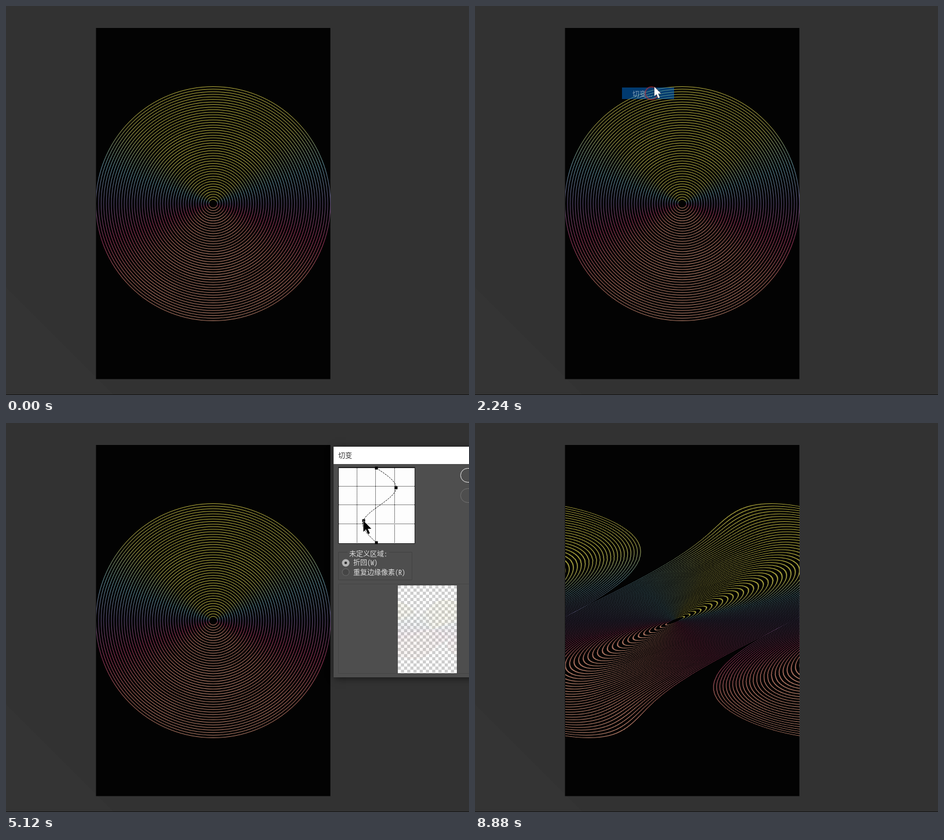
Animation of 800 by 673 pixels, one loop 9200 ms. Source, as an HTML page with a canvas:

```html
<!DOCTYPE html>
<html lang="zh-CN">
<head>
<meta charset="utf-8">
<title>切变</title>
<style>
html, body { margin: 0; width: 100%; height: 100%; overflow: hidden; background: #323232; }
canvas { display: block; }
</style>
</head>
<body>
<canvas id="stage" width="800" height="673"></canvas>
<script>
const LOOP = 9200, STEP = 80, W = 405, H = 607, K = 2, ROW = 20.9, MOVE = 480;
const RINGS = 45, INNER = 7.5, OUTER = 202.5;
const ctx = document.getElementById('stage').getContext('2d');
const UI = '"Noto Sans CJK SC", "Noto Sans CJK", sans-serif';
const FIXED = '"Noto Sans Mono CJK SC", ' + UI;
const BLUE = '#0073dc';
const PALETTE = ['#b2aa3c', '#a09c46', '#5f8f9c', '#5c4c76', '#98345a', '#a8665a', '#b8806a'];
const MENU = ['风格化', '模糊', '模糊画廊', '扭曲', '锐化', '视频', '像素化', '渲染', '杂色', '其它'];
const SUB = ['波浪...', '波纹...', '极坐标...', '挤压...', '切变...', '球面化...', '水波...', '旋转扭曲...', '置换...'];
const ARROW = new Path2D('M0 0V16L3.7 12.6 6.6 19.4 9.3 18.2 6.4 11.6H11.4Z');

// Pointer stops: [arrival, x, y]; each move fills at most the last MOVE ms before arrival
const STOPS = [
  [640, 100, 0], [960, 111, 64], [1520, 264, 67], [2000, 305, 151], [2160, 305, 151],
  [2240, 310, 140], [2880, 640, 165], [3520, 640, 112], [4080, 674, 112], [4720, 640, 165],
  [5360, 595, 173], [6240, 674, 112], [6800, 679, 112], [7680, 595, 173], [7840, 598, 172]];

// Drags of the two curve points: [press, release]
const UPPER = [[3520, 4080], [6320, 6800]];
const LOWER = [[3040, 3040], [4720, 5360], [7760, 7840]];
const CLICKS = [2160, ...[...UPPER, ...LOWER].map(d => d[0])];

const clamp = (v, a = 0, b = 1) => Math.max(a, Math.min(b, v));

function pointerAt(t) {
  const i = Math.max(1, STOPS.findLastIndex(s => s[0] <= t) + 1);
  const a = STOPS[i - 1], b = STOPS[i] || a;
  const u = clamp(1 - (b[0] - t) / Math.min(MOVE, b[0] - a[0] || 1)), e = u * u * (3 - 2 * u);
  return [a[1] + (b[1] - a[1]) * e, a[2] + (b[2] - a[2]) * e];
}

// A point follows the pointer while dragged and stays where it was released
function dragged(drags, t) {
  const d = drags.findLast(d => d[0] <= t);
  return d ? [pointerAt(Math.min(t, d[1]))] : [];
}

const nodesAt = t => [[640, 78], ...dragged(UPPER, t), ...dragged(LOWER, t), [640, 207]];

// Natural cubic spline giving x for each y
function spline(p) {
  const n = p.length - 1, c = Array(n + 1).fill(0), m = c.slice();
  for (let i = 1; i < n; i++) {
    const h0 = p[i][1] - p[i - 1][1], h1 = p[i + 1][1] - p[i][1];
    const a = 2 * (h0 + h1) - h0 * c[i - 1];
    const bend = (p[i + 1][0] - p[i][0]) / h1 - (p[i][0] - p[i - 1][0]) / h0;
    c[i] = h1 / a;
    m[i] = (6 * bend - h0 * m[i - 1]) / a;
  }
  for (let i = n - 1; i > 0; i--) m[i] -= c[i] * m[i + 1];
  return y => {
    let i = 0;
    while (i < n - 1 && y > p[i + 1][1]) i++;
    const h = p[i + 1][1] - p[i][1], u = y - p[i][1], v = p[i + 1][1] - y;
    return (m[i] * v ** 3 + m[i + 1] * u ** 3) / (6 * h)
      + (p[i][0] / h - m[i] * h / 6) * v + (p[i + 1][0] / h - m[i + 1] * h / 6) * u;
  };
}

function sheet(w, h) {
  const c = document.createElement('canvas');
  c.width = w;
  c.height = h;
  return c;
}

function makeDisc() {
  const c = sheet(W * K, H * K), g = c.getContext('2d');
  g.scale(K, K);
  g.translate(W / 2, 304);
  for (let i = 0; i < RINGS; i++) {
    const r = INNER + (OUTER - INNER) * i / (RINGS - 1);
    const grad = g.createLinearGradient(0, -r, 0, r);
    PALETTE.forEach((color, j) => grad.addColorStop(j / (PALETTE.length - 1), color));
    g.strokeStyle = grad;
    g.beginPath();
    g.arc(0, 0, r, 0, 7);
    g.stroke();
  }
  return c;
}

// Shift every row sideways along the curve, wrapping at the edges
function shear(src, nodes) {
  const w = src.width, h = src.height, c = sheet(w, h), g = c.getContext('2d'), f = spline(nodes);
  for (let y = 0; y < h; y++) {
    const dx = Math.round((f(78 + 129 * y / h) - 640) / 131 * h);
    for (const k of [-w, 0, w]) g.drawImage(src, 0, y, w, 1, dx + k, y, w, 1);
  }
  return c;
}

const disc = makeDisc(), mini = sheet(102, 152), result = shear(disc, nodesAt(LOOP));
const mg = mini.getContext('2d');
mg.imageSmoothingQuality = 'high';
mg.drawImage(disc, 0, 0, 102, 152);

function rect(color, x, y, w, h) {
  ctx.fillStyle = color;
  ctx.fillRect(x, y, w, h);
}

function frame(color, x, y, w, h, r = 0) {
  ctx.strokeStyle = color;
  ctx.beginPath();
  ctx.roundRect(x, y, w, h, r);
  ctx.stroke();
}

function dot(color, x, y, r) {
  ctx.fillStyle = color;
  ctx.beginPath();
  ctx.arc(x, y, r, 0, 7);
  ctx.fill();
}

function label(s, x, y, color, font = UI) {
  ctx.font = '12px ' + font;
  ctx.textBaseline = 'middle';
  ctx.fillStyle = color;
  ctx.fillText(s, x, y);
}

function shadowed(blur, off, draw) {
  ctx.save();
  ctx.shadowColor = 'rgba(0,0,0,.55)';
  ctx.shadowBlur = blur;
  ctx.shadowOffsetX = ctx.shadowOffsetY = off;
  draw();
  ctx.restore();
}

function faded(alpha, draw) {
  if (alpha <= 0) return;
  ctx.save();
  ctx.globalAlpha = Math.min(1, alpha);
  draw();
  ctx.restore();
}

function menu(items, x, y, w, h, top, hot, arrows) {
  shadowed(5, 3, () => rect('#f0f0f0', x, y, w, h));
  frame('#b4b4b4', x + .5, y + .5, w - 1, h - 1);
  items.forEach((s, i) => {
    const cy = top + 10 + i * ROW, color = i === hot ? '#fff' : '#222';
    if (i === hot) rect(BLUE, x + 2, Math.round(cy - 10), w - 5, 20);
    label(s, x + 19, cy + 1, color);
    if (!arrows) return;
    ctx.fillStyle = i === hot ? '#fff' : '#000';
    ctx.beginPath();
    ctx.moveTo(243, cy - 6);
    ctx.lineTo(248.5, cy - 1);
    ctx.lineTo(243, cy + 4);
    ctx.fill();
  });
}

function curveBox(nodes) {
  rect('#222', 574, 76, 133, 133);
  rect('#fdfdfd', 575, 78, 131, 130);
  ctx.save();
  ctx.strokeStyle = '#111';
  ctx.setLineDash([1, 1]);
  ctx.beginPath();
  for (let i = 0; i < 3; i++) {
    const d = Math.round(i * 32.4);
    ctx.moveTo(606.5 + d, 78);
    ctx.lineTo(606.5 + d, 208);
    ctx.moveTo(575, 109.5 + d);
    ctx.lineTo(706, 109.5 + d);
  }
  ctx.stroke();
  ctx.setLineDash([3, 1.5]);
  ctx.beginPath();
  const f = spline(nodes);
  for (let y = 78; y <= 207; y++) ctx.lineTo(f(y), y);
  ctx.stroke();
  ctx.restore();
  for (const [x, y] of nodes) rect('#000', Math.round(x) - 2.5, Math.round(y) - 2.5, 5, 5);
}

function preview(nodes) {
  frame('#464646', 574.5, 278.5, 240, 155);
  ctx.save();
  ctx.beginPath();
  ctx.rect(677, 281, 102, 152);
  ctx.clip();
  rect('#fff', 677, 281, 102, 152);
  for (let j = 0; j < 29; j++)
    for (let i = j % 2; i < 19; i += 2) rect('#cdcdcd', 677 + i * 5.4, 281 + j * 5.4, 5.4, 5.4);
  ctx.globalAlpha *= .3;
  ctx.drawImage(shear(mini, nodes), 677, 281);
  ctx.restore();
}

function dialog(t) {
  const nodes = nodesAt(t);
  shadowed(12, 2, () => rect('#4e4e4e', 566, 41, 260, 399));
  rect('#fff', 566, 41, 260, 30);
  label('切变', 574, 56, '#333');
  curveBox(nodes);
  frame('#e8e8e8', 785.5, 78.5, 60, 24, 12);
  frame('#707070', 785.5, 113.5, 60, 24, 12);
  frame('#424242', 574.5, 223.5, 127, 48);
  rect('#4e4e4e', 590, 220, 72, 8);
  label('未定义区域:', 593, 226, '#ddd', FIXED);
  dot('#b4b4b4', 587, 242, 6.5);
  dot('#333', 587, 242, 2.3);
  dot('#6a6a6a', 587, 258, 6.5);
  dot('#454545', 587, 258, 5.5);
  label('折回(W)', 600, 241, '#ddd', FIXED);
  label('重复边缘像素(R)', 600, 258, '#ddd', FIXED);
  preview(nodes);
}

function pointer(x, y, black) {
  ctx.save();
  ctx.translate(x, y);
  if (black) ctx.scale(1.2, 1.2);
  ctx.fillStyle = black ? '#000' : '#fff';
  ctx.strokeStyle = black ? '#fff' : '#222';
  ctx.lineWidth = .8;
  ctx.stroke(ARROW);
  ctx.fill(ARROW);
  ctx.restore();
}

// A ring spreads from where the button was pressed
function ripple(start, t) {
  const age = t - start;
  if (age < 0 || age > 240) return;
  faded(.8 - age / 400, () => {
    ctx.lineWidth = 2;
    ctx.strokeStyle = '#b8323a';
    ctx.beginPath();
    ctx.arc(...pointerAt(start), 2 + age / 9, 0, 7);
    ctx.stroke();
  });
}

function backdrop(t) {
  rect('#323232', 0, 0, 800, 673);
  ctx.fillStyle = '#343434';
  ctx.beginPath();
  ctx.moveTo(0, 487);
  ctx.lineTo(186, 673);
  ctx.lineTo(0, 673);
  ctx.fill();
  rect('#141414', 0, 672, 800, 1);
  rect('#030303', 155.5, 38, W, 607.5);
  ctx.drawImage(t >= 8720 ? result : disc, 155.5, 38, W, H);
}

function menus(t, x, y) {
  const inSub = t >= 1200 && x > 254;
  const hot = t < 640 ? -1 : inSub ? 3 : Math.floor((y + 4.7) / ROW);
  const pick = inSub ? Math.max(0, Math.floor((y - 58) / ROW)) : -1;
  faded((t - 240) / 240, () => menu(MENU, 4, -30, 252, 236, -4.7, hot, true));
  faded((t - 1120) / 240, () => menu(SUB, 252, 55, 95, 194, 58, pick));
}

function chosenItem() {
  rect(BLUE, 254, 141, 90, 20);
  label(SUB[4], 272, 152, '#fff');
}

function draw(t) {
  const [x, y] = pointerAt(t);
  backdrop(t);
  if (t >= 320 && t < 2160) menus(t, x, y);
  if (t >= 2160) faded(1 - (t - 2080) / 320, chosenItem);
  faded(Math.min((t - 2320) / 240, (8800 - t) / 240), () => dialog(t));
  CLICKS.forEach(start => ripple(start, t));
  if (t >= 640 && t < 8720) pointer(x, y, x > 566 && y > 71);
}

function tick() {
  draw(Math.floor(performance.now() % LOOP / STEP) * STEP);
  requestAnimationFrame(tick);
}
tick();
</script>
</body>
</html>
```
